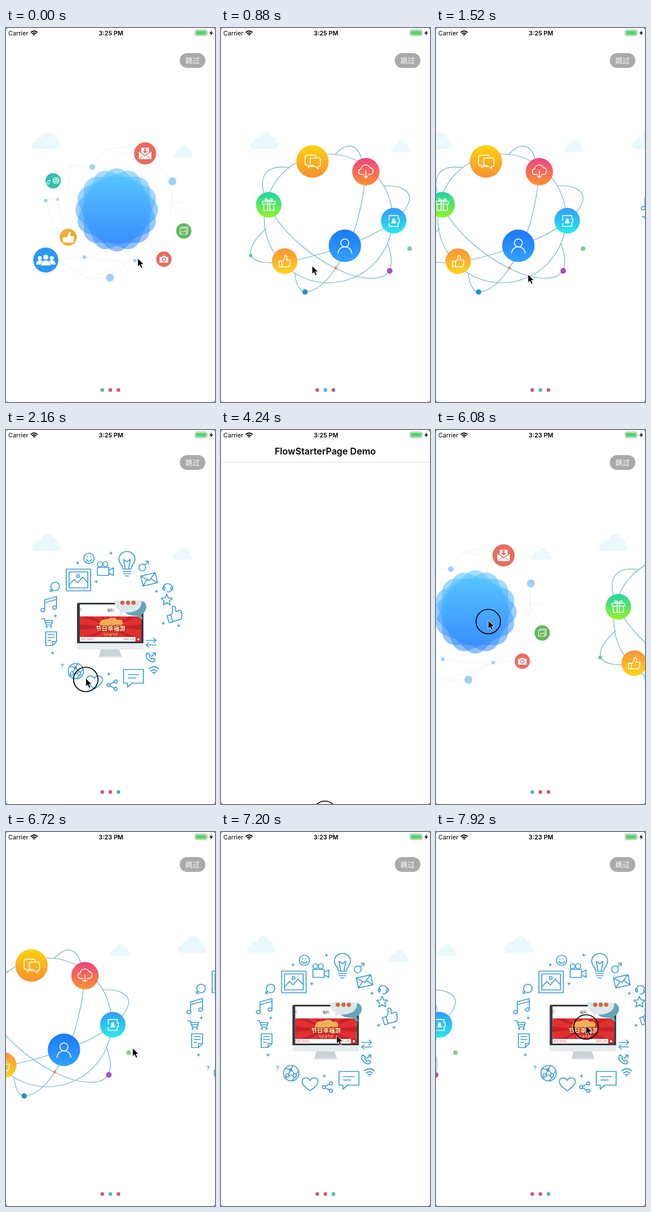
An HTML page for the animation above (8 s loop, 368x656 px).

```html
<!DOCTYPE html>
<html lang="zh">
<head>
<meta charset="utf-8">
<style>
html, body { margin: 0; width: 100%; height: 100%; overflow: hidden; background: #444; }
svg { display: block; }
#stage { width: 368px; height: 656px; border-radius: 4px; background: #fff; }
text { font-family: Inter, Roboto, sans-serif; }
.cjk { font-family: "Noto Sans CJK SC", "Noto Sans CJK", sans-serif; }
.line { fill: none; stroke-linecap: round; stroke-linejoin: round; }
.line use { vector-effect: non-scaling-stroke; }
</style>
</head>
<body>
<svg id="stage" viewBox="0 0 368 656">
<defs>
  <path id="cloud" fill="#eaf9fb" d="M7 30C-2 29-2 18 7 18C7 10 13 8 18 11C19-2 35-3 39 9C46 8 48 14 45 18C53 20 52 30 45 30Z"/>
  <path id="thumb" vector-effect="non-scaling-stroke" d="M-10 0h5v10h-5zM-5 1C-2-1 0-4 0-9c2-2 5 0 4 3l-1 4h5c3 0 3 3 1 3.500c2 .5 1 3 0 3c1 1 0 3-1 3c0 2-1 2.500-2 2.500h-7l-4-1"/>
  <marker id="plus" viewBox="-3 -3 6 6" markerWidth="6" markerHeight="6" markerUnits="userSpaceOnUse"><path d="M-2.500 0h5M0-2.500v5" stroke="#3c9fda" stroke-width="1.600"/></marker>
  <linearGradient id="sky" x1="0" y1="0" x2="0" y2="1"><stop stop-color="#52c6ff"/><stop offset="1" stop-color="#2a82ff"/></linearGradient>
  <mask id="petals"><g id="petalSet" fill="#fff" fill-opacity=".53"></g></mask>
  <clipPath id="banner"><rect x="130" y="327" width="108" height="36"/></clipPath>
</defs>

<g id="nav">
  <text x="183.500" y="42.500" font-size="16" font-weight="600" text-anchor="middle">FlowStarterPage Demo</text>
  <path d="M0 56.500H368" stroke="#dcdcde"/>
</g>

<g id="guide">
  <rect width="368" height="656" fill="#fff"/>
  <g id="pages">
    <g>
      <use href="#cloud" x="45" y="182"/>
      <use href="#cloud" transform="translate(294 206) scale(.68 .72)"/>
      <path class="line" stroke="#e8eaec" stroke-width=".7" stroke-dasharray="5 1.500" d="M83 268L115 240L152 244L175 213L245 203M175 213L208 220M245 220L293 269L291 306L313 345M291 306L311 306M70 303L91 300L102 350M70 303L83 345L109 367M70 407L138 402L183 408L227 408L278 405M92 408L142 439L227 408L313 362M142 439L183 438L240 390M290 330L293 269M108 285L115 240"/>
      <rect x="120" y="244" width="150" height="150" fill="url(#sky)" mask="url(#petals)"/>
      <g fill="#9fd2f7">
        <circle cx="152" cy="244" r="5"/><circle cx="293" cy="269" r="7"/><circle cx="183" cy="438" r="7"/>
        <circle cx="70" cy="303" r="3.300"/><circle cx="91" cy="300.500" r="2.500"/>
        <circle cx="138" cy="402" r="3.300"/><circle cx="227" cy="408" r="3.300"/>
      </g>
      <circle cx="245" cy="220" r="19.500" fill="#ec6a5f"/>
      <circle cx="278" cy="405.500" r="13.500" fill="#ec6a5f"/>
      <circle cx="83" cy="268" r="13.500" fill="#32bfae"/>
      <circle cx="109.500" cy="367" r="15" fill="#efae31"/>
      <circle cx="70" cy="407" r="22" fill="#2b98f5"/>
      <circle cx="313" cy="356" r="13.500" fill="#63b65a"/>
      <g fill="#fff">
        <path d="M234 217l11 8 11-8v13h-22zM238 210h14v8l-7 5-7-5z"/>
        <path d="M243.500 211h3v5h3l-4.500 4-4.500-4h3z" fill="#ec6a5f"/>
        <path d="M234 230l8-6M256 230l-8-6" stroke="#ec6a5f"/>
        <circle cx="88" cy="267.500" r="6"/>
        <path class="line" stroke="#32bfae" stroke-width=".8" d="M82 267.500h12M88 261.500v12M83 264.500h10M83 270.500h10M88 261.500c-4 4-4 8 0 12c4-4 4-8 0-12"/>
        <path class="line" stroke="#fff" d="M74 268l3.500-1-1.500 6.500-4 .5z"/>
        <use href="#thumb" transform="translate(110 367) scale(.95)"/>
        <path d="M100 367h5v9h-5zM106 368h13v8h-11z"/>
        <circle cx="59.500" cy="403.500" r="3.500"/><circle cx="80.500" cy="403.500" r="3.500"/>
        <path d="M53 414c0-8 11-9 13-3l-1 4H53zM87 414c0-8-11-9-13-3l1 4h12z"/>
        <g stroke="#2b98f5"><circle cx="70" cy="402" r="5"/><path d="M61 417c0-13 18-13 18 0z"/></g>
        <path d="M270.500 401.500h4l1.500-2h4l1.500 2h4v10h-15z"/>
        <circle cx="278" cy="406" r="3" stroke="#ec6a5f" stroke-width="1.300"/>
      </g>
      <path class="line" stroke="#fff" d="M307 351h11v11h-11zM309 351v-2h11v11h-2M308 360l3-4 2 2 2-3 2 4M310 354h.5"/>
    </g>

    <g transform="translate(368)">
      <use href="#cloud" x="45" y="182"/>
      <use href="#cloud" transform="translate(294 196) scale(.68 .72)"/>
      <g class="line" stroke="#6fb2da" stroke-width="1.200">
        <circle cx="184" cy="334" r="113"/>
        <path d="M125 430C127 452 135 464 145 463C180 460 215 400 233 345C245 300 250 275 246 245C240 205 220 195 196 222"/>
        <path d="M282 277C310 275 328 285 327 300C322 330 270 362 225 378C170 398 110 416 70 411C40 407 38 385 74 352"/>
        <path d="M115 245C75 239 58 260 74 300C95 360 180 425 240 437C290 446 305 425 288 377"/>
      </g>
      <circle cx="327" cy="387" r="4" fill="#8cc890"/>
      <circle cx="292" cy="426" r="5" fill="#a650c4"/>
      <circle cx="197" cy="421" r="2.500" fill="#f2853f"/>
      <circle cx="143" cy="463" r="4.700" fill="#2090d4"/>
      <circle cx="47" cy="399" r="3" fill="#60cc78"/>
      <g id="balls"></g>
      <g class="line" stroke="#fff" stroke-width="1.500">
        <path d="M158 241h-5l-4 4v-4h-3q-3 0-3-3v-12q0-3 3-3h13q3 0 3 3M155 228h12q3 0 3 3v9q0 3-3 3h-1v4l-5-4h-6q-3 0-3-3v-9q0-3 3-3z"/>
        <path d="M246 257h-4c-6-1-6-9 0-10c0-8 13-9 15-2c8 0 7 12 0 12h-3M250 250v13m-3.500-3.500l3.500 3.500 3.500-3.500"/>
        <path d="M68 304h22v5H68zM70 309h18v11H70zM77 304v16M81 304v16M79 304c-12-1-5-10 0 0c5-10 12-1 0 0"/>
        <use href="#thumb" transform="translate(107 409)"/>
        <circle cx="213" cy="377" r="7"/><path d="M201 395c1-15 23-15 24 0"/>
        <path d="M291 329h16v6h2v6h-2v7h-16v-5M291 329v8"/>
        <circle cx="299" cy="336.500" r="2" fill="#fff"/><path fill="#fff" d="M295.500 342c0-4 7-4 7 0z"/>
      </g>
    </g>

    <g transform="translate(736)">
      <use href="#cloud" x="45" y="182"/>
      <use href="#cloud" transform="translate(294 206) scale(.68 .72)"/>
      <g class="line" stroke="#3c9fda" stroke-width="1.700">
        <path d="M106 244h43v38h-43zM111 249h33v28h-33zM111 272l9-10 6 6 9-10 9 10"/><circle cx="127" cy="256" r="2.500"/>
        <circle cx="146" cy="225" r="9"/><path d="M143 222v.5M149 222v.5M141 227q5 7 10 0"/>
        <circle cx="165.500" cy="235.500" r="4.500"/><circle cx="175" cy="235.500" r="4.500"/><path d="M161 241h20v14h-20zM181 246l8-4v13l-8-4"/>
        <path d="M206 244c0-8-8-9-7-19c2-16 26-16 28 0c1 10-7 11-7 19zM206 248h14M207 252h12M210 256h6M210 243l-3-16 6 4 6-4-3 16"/>
        <circle cx="240" cy="241" r="6"/><path d="M244.500 236.500l6.500-6.500h-5m5 0v5"/>
        <path d="M-13-9h26v18h-26zl13 11 13-11M-13 9l9-9M13 9l-9-9" transform="translate(252 262) rotate(-13)"/>
        <path d="M277 277c0-10 15-10 16 0M277 274l-1 5 3 2 1-5zM293 274l1 5-3 2-1-5M292 281l-5 3h-3"/>
        <path d="M283 288l2.800 6.500 7 .6-5.300 4.700 1.600 7-6.100-3.700-6.100 3.700 1.600-7-5.300-4.700 7-.6z"/>
        <use href="#thumb" transform="translate(296 322) rotate(-17) scale(1.300)"/>
        <circle cx="86.500" cy="274.500" r="7.500"/><path d="M81 280l-3.500 3.500M77.500 280l4 4"/>
        <path d="M68 315v-17l21-6v18M68 303l21-6"/><ellipse cx="65" cy="316" rx="3.500" ry="3"/><ellipse cx="85.500" cy="311.500" rx="3.500" ry="3"/>
        <path d="M63 331h4l4 11h9l2-8H68M70 338h11"/><circle cx="71.500" cy="345" r="1"/><circle cx="79" cy="345" r="1"/>
        <path d="M70 354h19v17l-7 7H70zM82 378v-7h7M74 359h11M74 364h11M74 369h5"/>
        <circle cx="123" cy="423" r="13.500"/><path d="M112 415q9 0 17 9M118 425q6-12 8-15M119 427h7M131 425l5-6M115 430l-3 2M130 430q-4 4-6 6"/>
        <circle cx="116" cy="427" r="3"/><circle cx="129" cy="427" r="3"/><circle cx="122" cy="417" r="2"/>
        <path d="M156 454c-9-6-14-11-14-16c0-8 11-9 14-2c3-7 14-6 14 2c0 5-5 10-14 16z"/>
        <circle cx="180.500" cy="447.500" r="2.700"/><circle cx="193" cy="441" r="2.700"/><circle cx="193" cy="454" r="2.700"/><path d="M183 446l7.500-3.700M183 449l7.500 3.700"/>
        <path d="M207 420h35v24h-20l-8 7v-7h-7zM215 429h19M215 435h13"/>
        <path d="M252 419q8.500-7.500 17 0M255 423q5.500-5 11 0M258 426q2.500-2 5 0M260.500 428v.5"/>
        <path d="M249 391c-5 4-1 11 3 13c5 4 9 4 11-1l-4-3-3 2-4-5 2-2zM256 397l7-6h-5m5 0v5"/>
        <path d="M247 369h17l-4-4m4 4l-4 4M264 377h-17l4-4m-4 4l4 4"/>
      </g>
      <polyline fill="none" points="126,233 185,216 159,266 87,326 82,391 181,428 265,283 277,339 304,343" style="marker:url(#plus)"/>
      <text x="99" y="418" font-size="10" font-weight="600" text-anchor="middle" fill="#3c9fda">?</text>

      <path d="M167 384h32l4 13h-39z" fill="#ccd3d7"/><path d="M163 397h41v2h-41z" fill="#e2e6e9"/>
      <rect x="125" y="303" width="117" height="82" rx="3" fill="#e8ecee"/>
      <path d="M125 374v-68q0-3 3-3h111q3 0 3 3v68z" fill="#373c43"/>
      <rect x="130" y="306" width="108" height="65" fill="#fff"/>
      <g clip-path="url(#banner)">
        <rect x="130" y="327" width="108" height="36" fill="#e2302f"/>
        <g id="rays" fill="#c9212a"></g>
        <path d="M164 341q2-10 14-9q12-6 18 1q12-2 9 9l-6 10h-28z" fill="#efb052"/>
      </g>
      <path class="line" stroke="#777" d="M133 312l-2.500 3 2.500 3"/>
      <g text-anchor="middle">
        <text class="cjk" x="184" y="317.500" font-size="6" fill="#444">福利</text>
        <text class="cjk" x="184" y="351.500" font-size="10.500" font-weight="900" fill="#fff3b0" stroke="#b0181e" stroke-width="2" paint-order="stroke">节日幸福游</text>
        <text class="cjk" x="184" y="359.500" font-size="5" fill="#ffe58a">欢乐送不停</text>
      </g>
      <g font-size="5" fill="#df493f"><text x="131" y="369">200 100%</text><text x="207" y="369">500 x15</text></g>
      <rect x="228" y="363" width="10" height="8" fill="#d82631"/><circle cx="233" cy="367" r="2" fill="#fff"/>
      <path d="M208 318q7 9 23 8q6 6 10 6l-3-8q10-6 9-15q-1-8-10-10z" fill="#65a5b6"/>
      <path d="M191 299h48q0 15-13 19q-12 4-19 1l-7 6 1-8q-9-5-10-18z" fill="#dce7ec"/>
      <g fill="#d8643e"><circle cx="205" cy="303" r="3.700"/><circle cx="215" cy="303" r="3.700"/><circle cx="224.500" cy="303" r="3.700"/></g>
    </g>
  </g>
  <rect x="306" y="44" width="45" height="26" rx="13" fill="#aaa"/>
  <text class="cjk" x="328.500" y="61.500" font-size="12.500" text-anchor="middle" fill="#fff">跳过</text>
  <g id="pager"></g>
</g>

<g id="status">
  <text x="4" y="13" font-size="10.800">Carrier</text>
  <path d="M43.500 8q6-5.500 12 0M45.800 10.300q3.700-3.300 7.400 0" fill="none" stroke="#000" stroke-width="1.900"/>
  <path d="M47.500 11.500q2-1.500 4 0l-2 2z"/>
  <text id="clock" x="184.800" y="13" font-size="10.800" font-weight="600" text-anchor="middle"></text>
  <rect x="333" y="3.500" width="21" height="10" rx="2.500" fill="#fff" stroke="#9a9a9a"/>
  <rect x="334.500" y="5" width="18" height="7" rx="1.300" fill="#4cd964"/>
  <path d="M355.500 7q1.500 1.500 0 3z" fill="#9a9a9a"/>
  <path d="M362.500 4l-4.500 5.500h3l-1 4 4.500-5.500h-3z"/>
</g>

<g id="pointer">
  <circle id="touch" r="21.500" fill="none" stroke="#000" stroke-width="1.700"/>
  <path d="M0-2v14.500l3.400-3 2.500 5.700 2.500-1.100-2.500-5.700h4.600z" stroke="#fff" stroke-width=".8"/>
</g>
</svg>

<script>
const LOOP = 8000, STEP = 80, WIDTH = 368;
const RESTART = 4400, SETTLE = 560, GLIDE = 900, FADE_START = 2240, FADE = 400;

const $ = id => document.getElementById(id);
const fillWith = (id, items, draw) => { $(id).innerHTML = items.map(draw).join(""); };
const range = n => [...Array(n).keys()];
const clamp = k => Math.min(1, Math.max(0, k));
const mix = (a, b, k) => a + (b - a) * k;
const smooth = k => k * k * (3 - 2 * k);
const easeOut = k => 1 - (1 - k) ** 3;

fillWith("petalSet", range(4), i =>
  `<rect x="137" y="261" width="116" height="116" rx="22" transform="rotate(${i * 22.5} 195 319)"/>`);
fillWith("rays", range(14), i =>
  `<path d="M184 346L264 339V353z" transform="rotate(${i * 360 / 14} 184 346)"/>`);
fillWith("pager", range(3), i => `<circle cx="${169.5 + i * 14.25}" cy="635" r="3.2"/>`);

function ball(x, y, r, top, bottom) {
  const id = `ball-${x}-${y}`;
  $("balls").innerHTML += `<linearGradient id="${id}" x1="0" y1="0" x2="0" y2="1"><stop stop-color="${top}"/>
    <stop offset="1" stop-color="${bottom}"/></linearGradient><circle cx="${x}" cy="${y}" r="${r}" fill="url(#${id})"/>`;
}
ball(156, 234, 28.5, "#fcd411", "#f7902f");
ball(250, 252, 24, "#ef4480", "#ff9130");
ball(79, 310, 22.5, "#1fd5a6", "#90f525");
ball(107, 409, 22.5, "#f9923c", "#ffd518");
ball(213, 382, 28.5, "#1b78f6", "#35a2ff");
ball(299, 338, 22.5, "#309bff", "#2aeae6");

// A press drags the page by dx; after release the page settles on `to`.
const gestures = [
  { press: 0, release: 0, x: 232, y: 406, dx: 0, page: 0, to: 0 },
  { press: 160, release: 480, x: 250, y: 406, dx: -150, page: 0, to: 1 },
  { press: 1320, release: 1520, x: 230, y: 434, dx: -68, page: 1, to: 2 },
  { press: 2080, release: 2250, x: 140.5, y: 437.5, dx: 0, page: 2, to: 2 },
  { press: 4160, release: 4330, x: 183, y: 672.5, dx: 0, page: 2, to: 2 },
  { press: RESTART, release: RESTART, x: 183, y: 690, dx: 0, page: 0, to: 0 },
  { press: 5720, release: 6120, x: 218, y: 336, dx: -140, page: 0, to: 1 },
  { press: 6560, release: 6720, x: 334, y: 381, dx: -111, page: 1, to: 2 },
  { press: 7600, release: LOOP, x: 189, y: 342, dx: 94, page: 2, to: 1 }
];

function gestureState(t) {
  const index = gestures.findLastIndex(g => g.press <= t);
  const g = gestures[index], next = gestures[index + 1];
  const pressed = t < g.release;
  const dragged = pressed ? g.dx * (t - g.press) / (g.release - g.press) : g.dx;
  let offset = g.page * WIDTH - dragged, x = g.x + dragged, y = g.y;
  if (!pressed) {
    offset = mix(offset, g.to * WIDTH, easeOut(clamp((t - g.release) / SETTLE)));
    const glide = Math.min(GLIDE, next.press - g.release);
    const k = smooth(clamp(1 - (next.press - t) / glide));
    x = mix(x, next.x, k);
    y = mix(y, next.y, k);
  }
  return { offset, x, y, pressed };
}

function render(t) {
  const { offset, x, y, pressed } = gestureState(t);
  const page = Math.round(offset / WIDTH);
  const restarted = t >= RESTART;
  $("pages").setAttribute("transform", `translate(${-offset})`);
  $("guide").setAttribute("opacity", restarted ? 1 : 1 - smooth(clamp((t - FADE_START) / FADE)));
  $("pointer").setAttribute("transform", `translate(${x} ${y})`);
  $("touch").style.display = pressed ? "" : "none";
  $("clock").textContent = restarted ? "3:23 PM" : "3:25 PM";
  [...$("pager").children].forEach((dot, i) => dot.setAttribute("fill", i === page ? "#4db0e8" : "#d9546f"));
}

const start = performance.now();
function tick() {
  const t = (performance.now() - start) % LOOP;
  render(Math.floor(t / STEP) * STEP);
  requestAnimationFrame(tick);
}
tick();
</script>
</body>
</html>
```
